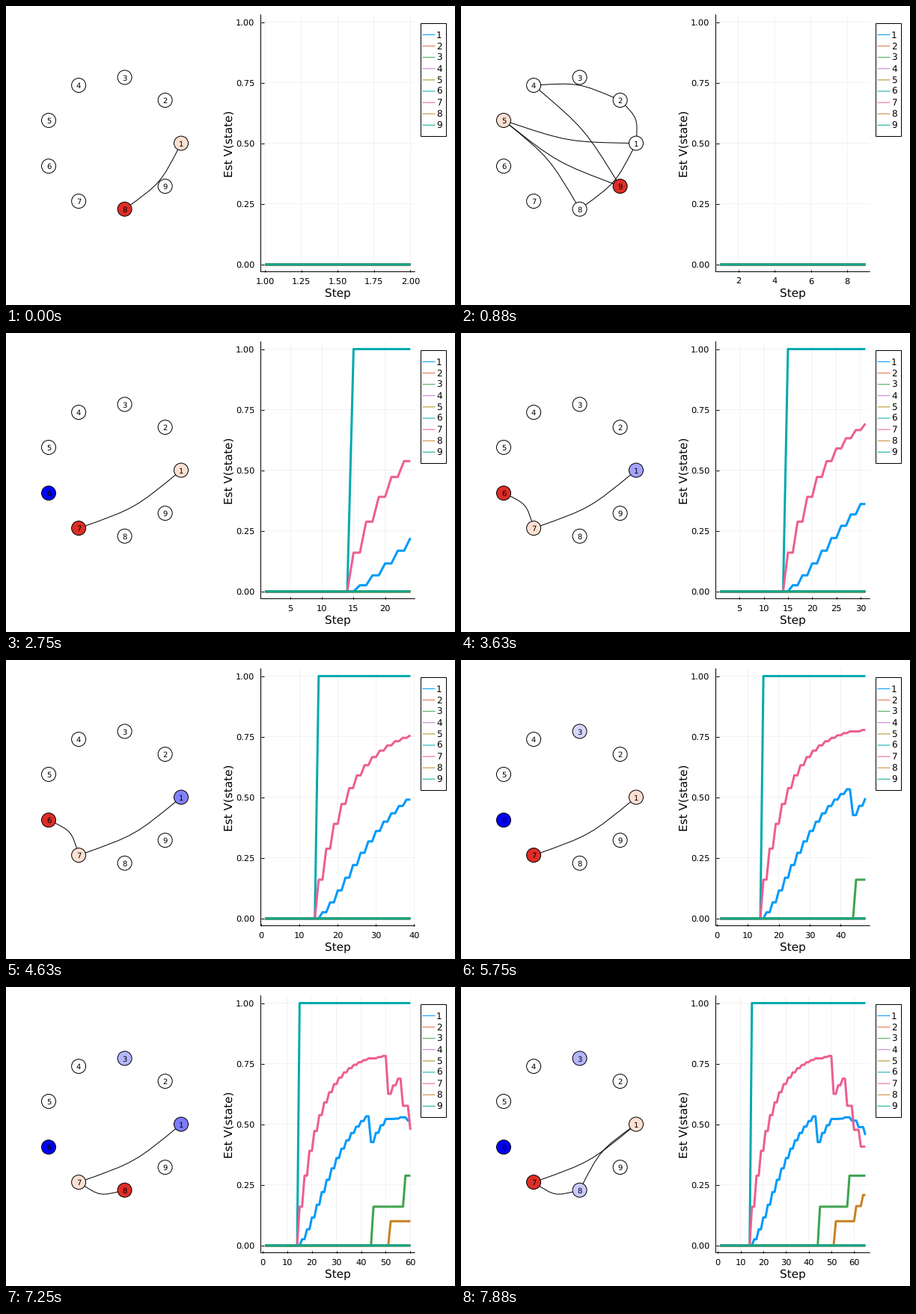
Write a matplotlib script that moves like this. It is 600x400 px and loops after 8000 ms.

```python
import math

import matplotlib.pyplot as plt
import numpy as np
from matplotlib.animation import FuncAnimation
from matplotlib.patches import Circle, PathPatch, Rectangle
from matplotlib.path import Path

W, H, DPI = 600, 400, 100
FRAMES, INTERVAL = 64, 125
PX = 72 / DPI  # points per pixel

N, GOAL = 9, 6
ALPHA, GAMMA = 0.2, 0.8
EPISODES = (["185942159285176"] + ["176"] * 14
            + ["136", "176", "176", "17876", "176", "1736", "17817817"])

COLORS = ["#009afa", "#e36f47", "#3ea44e", "#c371d2", "#ac8e18",
          "#00aaae", "#ed5e93", "#c68225", "#00a98d"]
CURRENT, PREVIOUS = "#de2d26", "#fee0d2"

plt.rcParams.update({"font.family": "DejaVu Sans", "path.snap": False,
                     "text.hinting": "none"})


def learn():
    """TD(0) values after every step, and the moves of the running episode."""
    v = np.zeros(N + 1)
    values, trails = [v.copy()], [[]]
    for episode in EPISODES:
        nodes = [int(c) for c in episode]
        moves = list(zip(nodes, nodes[1:]))
        for i, (s, d) in enumerate(moves):
            if d == GOAL:
                v[d] = 1
            v[s] += ALPHA * (GAMMA * v[d] - v[s])
            values.append(v.copy())
            trails.append(moves[:i + 1])
    return np.array(values), trails


VALUES, TRAILS = learn()


def nice_ticks(lo, hi, kmin=4, kmax=8, ideal=5):
    """Pick tick positions by granularity, simplicity, coverage and niceness."""
    span = hi - lo
    top = math.ceil(math.log10(span))
    best, best_score = [], -math.inf
    for z in range(top, top - 3, -1):
        for k in range(kmin, 2 * kmax):
            for q, nice in ((1, 1), (5, .9), (2, .7), (2.5, .5), (3, .2)):
                step = q * 10.0 ** z
                r = math.ceil((hi - (k - 1) * step) / step)
                while r * step <= lo:
                    ticks = [(r + i) * step for i in range(k)
                             if lo <= (r + i) * step <= hi]
                    if kmin <= len(ticks) <= kmax:
                        fine = 1 - abs(len(ticks) - ideal) / ideal
                        zero = r <= 0 and -r < k
                        cover = 1.5 * span / ((len(ticks) - 1) * step)
                        score = fine / 4 + zero / 6 + cover / 3 + nice / 4
                        if score > best_score + 1e-9:
                            best, best_score = ticks, score
                    r += 1
    return best


def tick_labels(ticks):
    digits = next(d for d in range(4)
                  if all(abs(t - round(t, d)) < 1e-6 for t in ticks))
    return [f"{abs(t) if abs(t) < 1e-9 else t:.{digits}f}" for t in ticks]


def node_xy(i):
    a = 2 * math.pi * (i - 1) / N
    return np.array([142.75 + 91.25 * math.cos(a), 183.6 - 89.5 * math.sin(a)])


def edge_path(s, d):
    """Curve with a doubled control point, bowed up towards lower numbers."""
    p, q = node_xy(s), node_xy(d)
    dx, dy = q - p
    normal = np.array([dy, -dx]) / math.hypot(dx, dy)
    if normal[1] > 0:
        normal = -normal
    ctrl = (p + q) / 2 + 14 * normal * (1 if s > d else -1)
    return Path([p, ctrl, ctrl, q], [Path.MOVETO] + [Path.CURVE4] * 3)


fig = plt.figure(figsize=(W / DPI, H / DPI), dpi=DPI, facecolor="white")

stage = fig.add_axes([0, 0, 1, 1])
stage.set(xlim=(0, W), ylim=(H, 0))
stage.axis("off")


def label(x, y, text, size, **kw):
    stage.text(x, y, text, fontsize=size * PX, **kw)


# state graph
nodes = []
for i in range(1, N + 1):
    x, y = node_xy(i)
    nodes.append(stage.add_patch(
        Circle((x, y), 9.5, fc="white", ec="black", lw=PX, zorder=3)))
    label(x, y + 0.3, str(i), 10, ha="center", va="center_baseline", zorder=4)

# legend
stage.add_patch(Rectangle((554.5, 23.5), 34, 151, fc="white", ec="black", lw=PX))
for i, color in enumerate(COLORS):
    y = 38.5 + 15.1 * i
    stage.plot([557, 573], [y, y], color=color, lw=PX)
    label(575, y + 4.3, str(i + 1), 12)

label(443, 389, "Step", 15.2, ha="center")
label(306.5, 184, "Est V(state)", 15.2, ha="right", va="center", rotation=90)

# value chart
X0, X1, Y0, Y1 = 340.5, 546.2, 355.5, 11.8
chart = fig.add_axes([X0 / W, 1 - Y0 / H, (X1 - X0) / W, (Y0 - Y1) / H])
chart.patch.set_visible(False)
chart.set_ylim(-0.03, 1.03)
chart.set_yticks(np.linspace(0, 1, 5))
chart.set_yticklabels([f"{t:.2f}" for t in np.linspace(0, 1, 5)])
chart.set_axisbelow(True)
chart.grid(color="black", alpha=0.1, lw=0.5 * PX)
chart.spines[["top", "right"]].set_visible(False)
chart.spines[["left", "bottom"]].set_linewidth(PX)
chart.tick_params(direction="in", length=3.5 * PX, width=PX,
                  labelsize=11.4 * PX, pad=7.5 * PX)
chart.tick_params(axis="y", pad=8 * PX)
lines = [chart.plot([], [], color=c, lw=3 * PX, solid_capstyle="butt",
                    solid_joinstyle="round", clip_on=False)[0]
         for c in COLORS]

edges = []


def draw(frame):
    step = frame + 2
    v, trail = VALUES[step - 1], TRAILS[step - 1]

    while edges:
        edges.pop().remove()
    for s, d in dict.fromkeys(trail):
        edges.append(stage.add_patch(
            PathPatch(edge_path(s, d), fc="none", ec="black", lw=PX, zorder=2)))

    for i, node in enumerate(nodes, 1):
        node.set_facecolor((1 - v[i], 1 - v[i], 1))
    prev, cur = trail[-1]
    nodes[prev - 1].set_facecolor(PREVIOUS)
    nodes[cur - 1].set_facecolor(CURRENT)

    xs = np.arange(1, step + 1)
    for i, line in enumerate(lines, 1):
        line.set_data(xs, VALUES[:step, i])

    pad = 0.03 * (step - 1)
    ticks = nice_ticks(1 - pad, step + pad)
    chart.set_xticks(ticks, tick_labels(ticks))
    chart.set_xlim(1 - pad, step + pad)
    return lines + nodes + edges


anim = FuncAnimation(fig, draw, frames=FRAMES, init_func=lambda: draw(0),
                     interval=INTERVAL, repeat=True, repeat_delay=0, blit=False)
plt.show()
```
